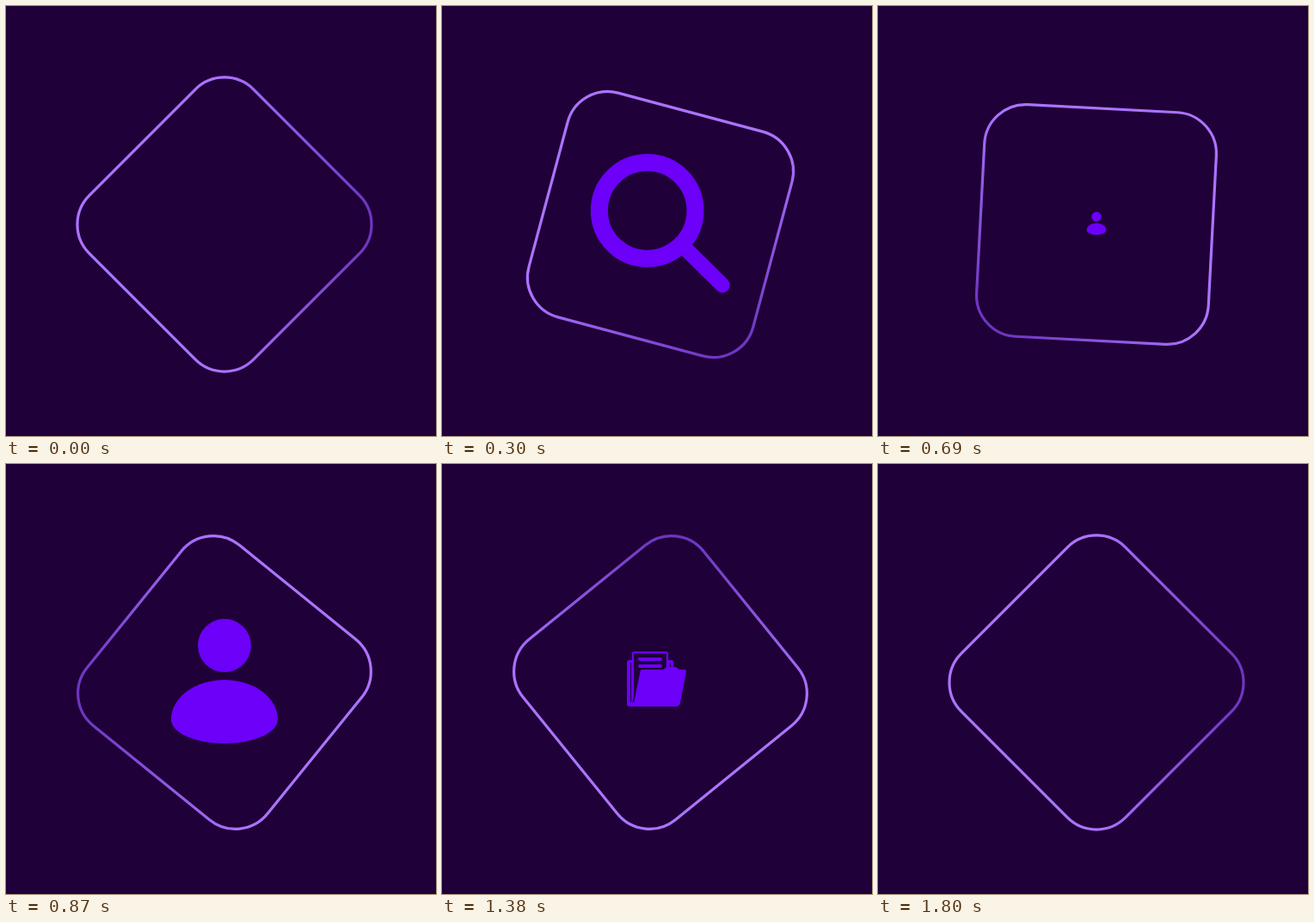
Recreate the animation shown at these times as an HTML page. Size 500 by 500 pixels, loop 1.83 s.

```html
<!DOCTYPE html>
<html lang="en">
<head>
<meta charset="utf-8">
<title>Rotating icon frame</title>
<style>
  html, body { margin: 0; width: 100%; height: 100%; overflow: hidden; background: #1f0038; }
  svg { display: block; width: 100vw; height: 100vh; }
  .ink { fill: #6c00f8; }
  .line { fill: none; stroke: #6c00f8; stroke-linecap: round; }
  .paper { fill: #1f0038; stroke: #6c00f8; stroke-width: 2.2; }
  .gap { fill: none; stroke: #1f0038; }
</style>
</head>
<body>
<svg viewBox="0 0 500 500">
  <defs>
    <linearGradient id="sheen" gradientUnits="userSpaceOnUse" x1="0" y1="0" x2="120" y2="-120">
      <stop offset="0" stop-color="#ac73ff"/>
      <stop offset="1" stop-color="#6d35c1"/>
    </linearGradient>
  </defs>

  <g id="frame" transform="translate(254 254) rotate(45)">
    <rect x="-135" y="-135" width="270" height="270" rx="48"
          fill="none" stroke="url(#sheen)" stroke-width="3.2"/>
  </g>

  <g id="search" visibility="hidden">
    <circle class="line" cx="238.7" cy="237.9" r="55.8" stroke-width="20"/>
    <path class="line" d="M280 279 L326 324.6" stroke-width="17.6"/>
  </g>

  <g id="person" visibility="hidden">
    <circle class="ink" cx="254" cy="210.2" r="31.6"/>
    <path class="ink" d="M190.7 298 A63.3 47 0 0 1 317.3 298 A63.3 28.5 0 0 1 190.7 298 Z"/>
  </g>

  <g id="folder" visibility="hidden">
    <g transform="translate(254 252.7) scale(1.4706) translate(-254 -252.7)">
      <path class="ink" d="M218 228 H264 V282 H218 Q215 282 215 279 V231 Q215 228 218 228 Z"/>
      <path class="ink" d="M262 228 H267 Q269 228 269 230 V237 H262 Z"/>
      <path class="gap" d="M219.6 231 V277 M265.6 231.5 V236" stroke-width="1"/>
      <rect class="paper" x="222" y="219.1" width="40" height="60" rx="1.5"/>
      <path class="line" d="M230 227 H254 M230 235 H254" stroke-width="4"/>
      <path class="gap" d="M230.5 239 L222.5 277" stroke-width="2"/>
      <path class="ink" d="M233 239 H256 Q258 239 259 237.5 Q260 236 262 236 H271
        Q273 236 274 237.5 Q275 239 277 239 H282 Q284.5 239 284 241.5
        L277 278 Q276 282 272 282 H219 Q222.5 281 223.2 277 L230.5 241 Q231 239 233 239 Z"/>
    </g>
  </g>
</svg>

<script>
  const STEP = 30, STEPS = 61, TURN = 60, SLOT = 20;
  const GROW = 10, SHRINK = 5.25;
  const frame = document.getElementById("frame");
  const icons = ["search", "person", "folder"].map(id => document.getElementById(id));

  const clamp = v => Math.min(1, Math.max(0, v));
  const ease = v => v < 0.5 ? 2 * v * v : 1 - 2 * (1 - v) ** 2;

  // Each icon grows, rests and shrinks inside its own slot.
  const iconScale = k => Math.min(ease(clamp(k / GROW)), ease(clamp((SLOT - k) / SHRINK)));

  function draw(k) {
    frame.setAttribute("transform", `translate(254 254) rotate(${45 + 360 * k / TURN})`);
    icons.forEach((icon, i) => {
      const s = iconScale(k - i * SLOT);
      icon.setAttribute("visibility", s > 0 ? "visible" : "hidden");
      icon.setAttribute("transform", `translate(254 252.7) scale(${s}) translate(-254 -252.7)`);
    });
  }

  function tick() {
    // The small lead keeps steps from landing late on slow refreshes.
    draw(Math.floor((performance.now() + 6) / STEP) % STEPS);
    requestAnimationFrame(tick);
  }
  tick();
</script>
</body>
</html>
```
